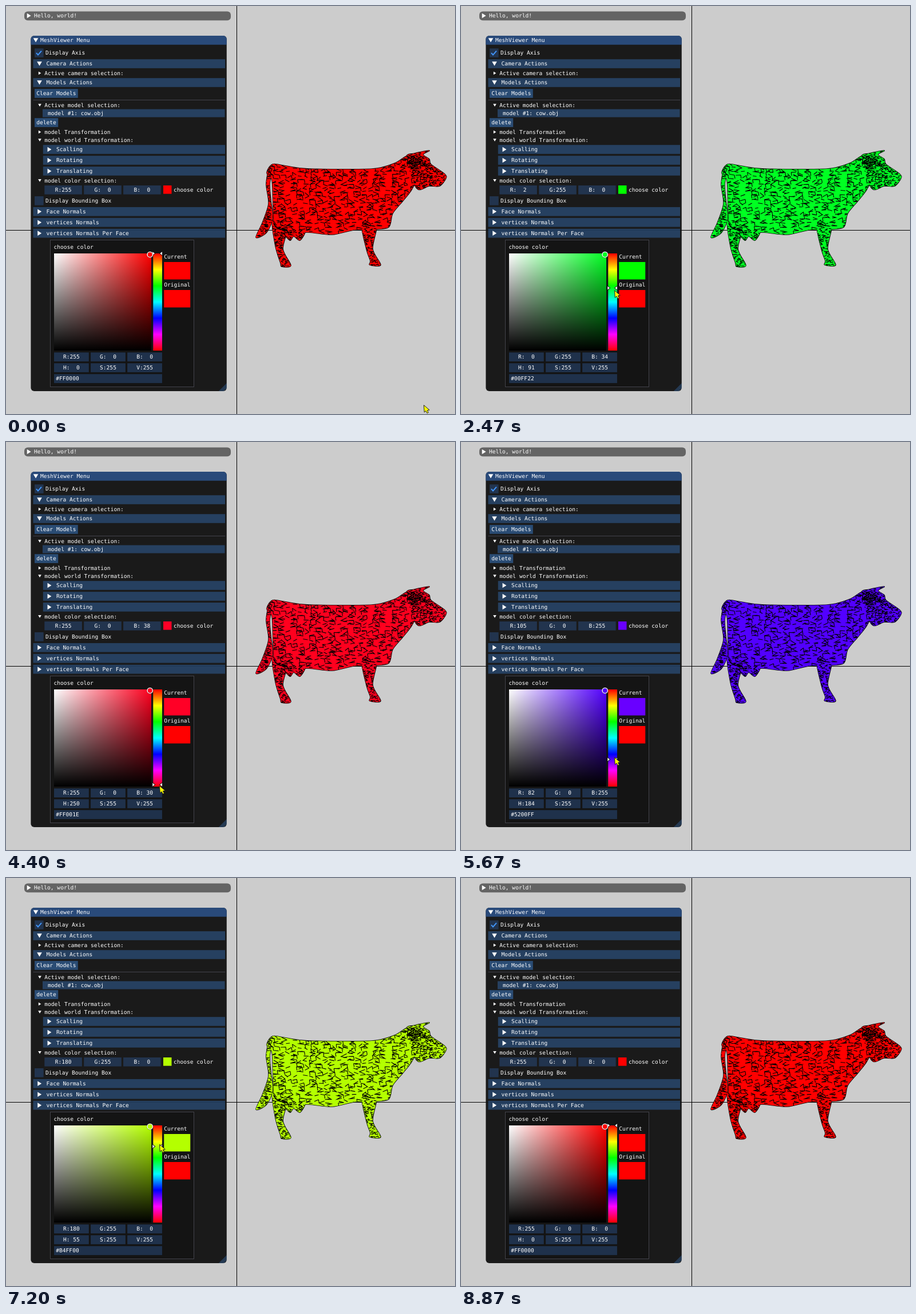
Recreate the animation shown at these times as an HTML page with a canvas. Size 785 px wide and 714 px high, loop 9.34 s.

```html
<!DOCTYPE html>
<html lang="en">
<head>
<meta charset="utf-8">
<title>Mesh viewer</title>
<style>
html, body { margin: 0; width: 100%; height: 100%; overflow: hidden; background: #ccc; }
canvas { display: block; }
</style>
</head>
<body>
<canvas id="stage" width="785" height="714"></canvas>
<script>
const ctx = document.getElementById('stage').getContext('2d');
const LOOP = 9340, TICK = 1000 / 15;

// Menu metrics: a 13 px font with its usual paddings, scaled down
const S = .824, FRAME = 19 * S, GAP = 4 * S, LINE = 13 * S, PAD = 8 * S, INDENT = 21 * S;
const LEFT = 43.4, TOP = 52, RIGHT = 385.8, BOTTOM = 674;
const HEADER = 'rgba(66,150,250,.31)', BUTTON = 'rgba(66,150,250,.4)', FIELD = 'rgba(41,74,122,.54)';
const BORDER = 'rgba(110,110,128,.5)';
const SQUARE = { x: 84, y: 433, size: 170 };

// Drag stops: time, hue one tick earlier, hue
const stops = [[1267, 0, 0], [1800, .1078, .1229], [3200, .5882, .598], [4400, .9752, .9804], [4533, .9902, 1],
  [4867, 1, 1], [5667, .7353, .7203], [7200, .2157, .2157], [7867, .02, 0]];
const hueKeys = stops.flatMap(([t, before, h]) => [[t - TICK, before], [t, h]]);
const arrive = [[0, 730, 698], [1000, 268, 440], [1133, 263, 436], [1267, 263, 436], [1400, 268, 440]];
const leave = [[8000, 268, 433], [8867, 75, 715]];

function at(keys, t) {
  let i = 1;
  while (i < keys.length - 1 && keys[i][0] < t) i++;
  const a = keys[i - 1], b = keys[i];
  const f = Math.max(0, Math.min(1, (t - a[0]) / (b[0] - a[0])));
  return a.slice(1).map((v, k) => v + (b[k + 1] - v) * f);
}
const hueAt = t => at(hueKeys, t)[0];
const barY = h => SQUARE.y + SQUARE.size * h;

// While dragging, the pointer runs one tick ahead of the hue
function mouseAt(t) {
  if (t < 1400) return at(arrive, t);
  if (t > 8000) return at(leave, t);
  return [268, barY(hueAt(t + TICK))];
}

const hueRgb = h => [5, 3, 1].map(n => {
  const k = (n + h * 6) % 6;
  return Math.round(255 * (1 - Math.max(0, Math.min(k, 4 - k, 1))));
});
const css = c => `rgb(${c})`;
const hex = c => '#' + c.map(v => v.toString(16).padStart(2, '0')).join('').toUpperCase();

function box(x, y, w, h, color) {
  ctx.fillStyle = color;
  ctx.fillRect(x, y, w, h);
}
function panel(x, y, w, h, radius, color) {
  ctx.beginPath();
  ctx.roundRect(x, y, w, h, radius);
  ctx.fillStyle = color;
  ctx.fill();
}
function text(s, x, y, align = 'left') {
  ctx.fillStyle = '#fff';
  ctx.textAlign = align;
  ctx.fillText(s, x, y + 3.2);
}
function shape(...p) {
  const path = new Path2D();
  for (let i = 0; i < p.length; i += 2) path.lineTo(p[i], p[i + 1]);
  path.closePath();
  return path;
}
function fill(path, color) {
  ctx.fillStyle = color;
  ctx.fill(path);
}
function stroke(path, color, width) {
  ctx.strokeStyle = color;
  ctx.lineWidth = width;
  ctx.stroke(path);
}
function arrow(x, y, r, down) {
  fill(down ? shape(x - r, y - r * .85, x + r, y - r * .85, x, y + r * .85)
            : shape(x - r * .75, y - r, x + r * .85, y, x - r * .75, y + r), '#fff');
}
function fields(x, y, w, names, values) {
  [...names].forEach((name, i) => {
    const fx = x + i * (w + GAP);
    box(fx, y, w, FRAME, FIELD);
    text(name + ':' + String(values[i]).padStart(3), fx + w / 2, y + FRAME / 2, 'center');
  });
}

let seed = 7;
const rnd = () => (seed = seed * 16807 % 2147483647) / 2147483647;

// Wedges and dashes on a gently bent grid, like half hidden triangle edges
function mesh(xs, ys, cell) {
  const path = new Path2D(), dx = cell * 1.3, dy = cell * .8;
  for (let y = Math.min(...ys); y < Math.max(...ys); y += dy)
    for (let x = Math.min(...xs); x < Math.max(...xs); x += dx) {
      const px = x + cell * .5 * Math.sin(y / 30) + rnd() * 2, py = y + 2 * Math.sin(x / 40) + rnd() * 2;
      const side = rnd() < .5 ? -1 : 1, reach = side * dx * (.5 + rnd() * .4);
      path.moveTo(px + reach, py + (rnd() - .3) * dy);
      path.lineTo(px, py);
      if (rnd() < .55) path.lineTo(px + reach, py - dy * rnd());
      if (rnd() < .4) {
        path.moveTo(px, py);
        path.lineTo(px + 1, py + dy * .9);
      }
    }
  return path;
}
// Smooth closed curve through a few points, with its mesh
function part(cell, ...p) {
  const n = p.length / 2, path = new Path2D();
  const pt = i => { const k = (i + n) % n * 2; return [p[k], p[k + 1]]; };
  path.moveTo(...pt(0));
  for (let i = 0; i < n; i++) {
    const [a, b, c, d] = [pt(i - 1), pt(i), pt(i + 1), pt(i + 2)];
    path.bezierCurveTo(b[0] + (c[0] - a[0]) / 7, b[1] + (c[1] - a[1]) / 7,
      c[0] - (d[0] - b[0]) / 7, c[1] - (d[1] - b[1]) / 7, ...c);
  }
  path.closePath();
  return { path, wires: mesh(p.filter((v, i) => i % 2 === 0), p.filter((v, i) => i % 2), cell) };
}
const tail = part(5, 460, 283, 455, 312, 459, 346, 448, 380, 437, 405, 455, 397, 466, 372, 463, 340, 461, 312, 465, 288);
const hindLeg = part(5, 466, 375, 471, 420, 480, 450, 482, 456, 498, 454, 484, 425, 492, 385);
const foreLeg = part(5, 622, 380, 630, 425, 637, 446, 636, 453, 655, 453, 641, 425, 648, 382);
const udder = part(5, 484, 392, 496, 410, 503, 403, 514, 410, 522, 392);
const trunk = part(8.5, 456, 292, 466, 277, 490, 280, 530, 285, 640, 285, 680, 275, 705, 262, 722, 290, 710, 320,
  694, 341, 676, 363, 669, 387, 640, 391, 608, 392, 570, 400, 528, 396, 488, 398, 470, 392, 467, 350, 465, 305);
const head = part(4.5, 700, 266, 714, 258, 740, 253, 729, 260, 740, 268, 743, 277, 767, 294, 769, 302,
  758, 315, 740, 315, 718, 319);
const ear = part(2.5, 704, 266, 720, 262, 738, 281, 722, 278, 709, 285);
const cow = [tail, hindLeg, foreLeg, udder, trunk, head, ear];

function drawCow(color) {
  cow.forEach(p => stroke(p.path, '#000', 1.6));
  cow.forEach(p => fill(p.path, color));
  for (const p of cow) {
    ctx.save();
    ctx.clip(p.path);
    stroke(p.wires, '#000', 1.1);
    ctx.restore();
  }
}

// Widgets stack downwards from y
function drawMenu(shown) {
  const x0 = LEFT + PAD, x1 = x0 + INDENT;
  let y = TOP + FRAME + PAD;
  const next = h => { const mid = y + h / 2; y += h + GAP; return mid; };
  const header = (x, label, down) => {
    box(x - 2.5, y, RIGHT - 2.8 - x + 2.5, FRAME, HEADER);
    const mid = next(FRAME);
    arrow(x + 8.5, mid, 4.3, down);
    text(label, x + 25 * S, mid);
  };
  const node = (label, down) => {
    const mid = next(LINE);
    arrow(x0 + 9, mid, 2.8, down);
    text(label, x1, mid);
  };
  const button = label => {
    box(x0, y, label.length * 7 * S + PAD, FRAME, BUTTON);
    text(label, x0 + GAP, next(FRAME));
  };
  const check = (label, on) => {
    box(x0, y, FRAME, FRAME, FIELD);
    const mid = next(FRAME);
    if (on) stroke(new Path2D(`M${x0 + 3} ${mid}l3 3.5l6 -7`), '#4296fa', 2);
    text(label, x0 + FRAME + GAP, mid);
  };

  panel(32, 9.5, 361, FRAME, 6, '#646464');
  arrow(40, 17, 4.3);
  text('Hello, world!', 49, 17);

  panel(LEFT, TOP, RIGHT - LEFT, BOTTOM - TOP, 6, 'rgba(15,15,15,.94)');
  panel(LEFT, TOP, RIGHT - LEFT, FRAME, [6, 6, 0, 0], '#294a7a');
  arrow(52, TOP + FRAME / 2, 4.3, true);
  text('MeshViewer Menu', 60, TOP + FRAME / 2);
  fill(shape(RIGHT, BOTTOM - 14, RIGHT, BOTTOM - 5, RIGHT - 5, BOTTOM, RIGHT - 14, BOTTOM), 'rgba(66,150,250,.25)');

  check('Display Axis', true);
  header(x0, 'Camera Actions', true);
  node('Active camera selection:');
  header(x0, 'Models Actions', true);
  button('Clear Models');
  box(x0 - 2.5, y, RIGHT - x0, 1, BORDER);
  next(S);
  node('Active model selection:', true);
  box(x1 - GAP, y - 2 * S, RIGHT - x1, LINE + GAP, HEADER);
  text(' model #1: cow.obj', x1, next(LINE));
  button('delete');
  node('model Transformation');
  node('model world Transformation:', true);
  ['Scalling', 'Rotating', 'Translating'].forEach(s => header(x1, s));
  node('model color selection:', true);
  fields(x1, y, 65.6, 'RGB', shown);
  const sx = x1 + 3 * (65.6 + GAP) + 1;
  box(sx, y, 14.5, FRAME - 1, css(shown));
  text('choose color', sx + 18, next(FRAME));
  check('Display Bounding Box');
  ['Face Normals', 'vertices Normals', 'vertices Normals Per Face'].forEach(s => header(x0, s));
}

function drawPicker(h, rgb, shown) {
  const { x, y, size } = SQUARE, bar = x + size + GAP, side = bar + FRAME + GAP;
  box(77, 409, 252, 258, '#141414');
  ctx.strokeStyle = '#43434b';
  ctx.lineWidth = 1;
  ctx.strokeRect(77.5, 409.5, 251, 257);
  text('choose color', 83.5, 422);

  const gradient = (dx, dy, colors) => {
    const g = ctx.createLinearGradient(x, y, x + dx, y + dy);
    colors.forEach((c, i) => g.addColorStop(i / (colors.length - 1), c));
    return g;
  };
  box(x, y, size, size, gradient(size, 0, ['#fff', css(rgb)]));
  box(x, y, size, size, gradient(0, size, ['rgba(0,0,0,0)', '#000']));
  box(bar, y, FRAME, size, gradient(0, size, ['#f00', '#ff0', '#0f0', '#0ff', '#00f', '#f0f', '#f00']));

  const my = barY(h);
  for (const [mx, d] of [[bar - 1, 1], [bar + FRAME, -1]]) {
    fill(shape(mx, my - 4, mx + 5 * d, my, mx, my + 4), '#000');
    fill(shape(mx, my - 3, mx + 3.8 * d, my, mx, my + 3), '#fff');
  }
  for (const [r, c] of [[5.6, '#808080'], [5.1, '#fff'], [3.9, css(rgb)]])
    panel(x + size - 2.3 - r, y + 2 - r, 2 * r, 2 * r, r, c);

  [['Current', css(shown)], ['Original', '#f00']].forEach(([label, color], i) => {
    const top = y + i * 49;
    text(label, side, top + LINE / 2 + .6);
    box(side, top + LINE + GAP + 1, 46, 30.5, color);
  });
  const w = (size + GAP + FRAME - 2 * GAP) / 3, row = i => y + size + GAP + i * (FRAME + GAP);
  fields(x, row(0), w, 'RGB', rgb);
  fields(x, row(1), w, 'HSV', [Math.round(h * 255), 255, 255]);
  box(x, row(2), 3 * w + 2 * GAP, FRAME, FIELD);
  text(hex(rgb), x + GAP, row(2) + FRAME / 2);
}

const pointer = shape(0, 0, .8, 12.5, 3.6, 10, 5.6, 14, 8, 13, 6, 9, 9.8, 8.4);
function drawMouse([x, y]) {
  ctx.save();
  ctx.translate(x + .5, y + .5);
  fill(pointer, '#ff0');
  stroke(pointer, '#222', 1);
  ctx.restore();
}

function draw(now) {
  const t = Math.floor((now % LOOP + 3.4) / TICK) * TICK;
  const h = hueAt(t), rgb = hueRgb(h), shown = hueRgb(hueAt(t - TICK)); // swatches trail by one tick
  ctx.font = '9.58px "DejaVu Sans Mono", monospace';
  ctx.textRendering = 'geometricPrecision';
  box(0, 0, 785, 714, '#ccc');
  box(403, 0, 1, 714, '#000');
  box(0, 392, 785, 1, '#000');
  drawCow(css(rgb));
  drawMenu(shown);
  drawPicker(h, rgb, shown);
  drawMouse(mouseAt(t));
}

const start = performance.now();
function loop() {
  draw(performance.now() - start);
  requestAnimationFrame(loop);
}
loop();
</script>
</body>
</html>
```
